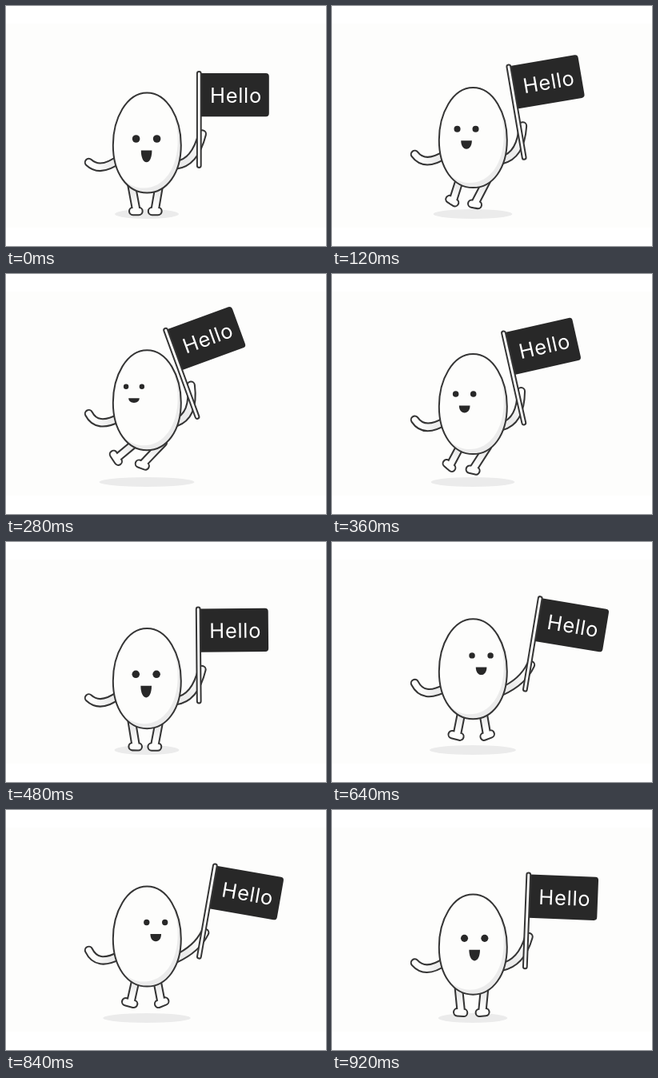
These frames come from a looping animation (400 by 300 pixels, 960 ms). An HTML page with a canvas:

```html
<!DOCTYPE html>
<html lang="en">
<head>
<meta charset="utf-8">
<title>Hello</title>
<style>
html, body { margin: 0; width: 100%; height: 100%; overflow: hidden; background: #fff; }
canvas { display: block; width: 400px; height: 300px; }
</style>
</head>
<body>
<canvas id="stage"></canvas>
<script>
const LOOP = 960, STEP = 40;
const INK = '#353535', DARK = '#282828', SHADE = '#ebebeb', PAPER = '#fdfdfc';
const canvas = document.getElementById('stage');
const ctx = canvas.getContext('2d');
const dpr = window.devicePixelRatio || 1;
canvas.width = 400 * dpr;
canvas.height = 300 * dpr;
ctx.scale(dpr, dpr);

// Each value: [at rest, change at top of left hop, change at top of right hop]
const POSE = {
  lift: [0, -13.6, -19.2],
  shadow: [40, 20, 22],
  tilt: [0, -20.6, 14.8],
  poleX: [241.3, -1.2, -0.7], poleY: [203, -22, -24.5],
  faceX: [175.6, -16.1, 17.3], faceY: [166, -26, -38],
  gap: [13, -3.2, -2.3], eye: [4.8, -1.65, -1.7], mouth: [14.8, -9.4, -8.2],
  shoulderLY: [191, -12, -14], handLY: [195.5, -21.5, -30],
  bendLX: [118, -4.4, -6], bendLY: [209, -15, -18],
  handRX: [245.3, -14.5, 5], handRY: [160, -21.5, -10],
  bendRX: [236, 0, 4], bendRY: [196.5, -20, -34],
  hipLX: [157, 5, 8], hipRX: [191.5, 5, -4.5],
  toeLX: [158.7, -25, -13.5], toeLY: [256.5, -32, -25],
  heelLX: [166, -26.5, -9.5], heelLY: [256.5, -23, -21],
  heelRX: [182.5, -16.6, 12], heelRY: [256.5, -20, -21],
  toeRX: [190, -16.3, 13], toeRY: [256.5, -17, -26]
};

function hop(t, mid, half, power) {
  const d = Math.abs(t - mid) / half;
  return d < 1 ? Math.cos(d * Math.PI / 2) ** power : 0;
}

function poseAt(t) {
  const left = hop(t, 252, 254, 2), right = hop(t, 743, 212, 1.4);
  const p = {};
  for (const key in POSE) {
    const [rest, l, r] = POSE[key];
    p[key] = rest + l * left + r * right;
  }
  return p;
}

function ellipse(x, y, rx, ry, fill) {
  ctx.beginPath();
  ctx.ellipse(x, y, rx, ry, 0, 0, Math.PI * 2);
  ctx.fillStyle = fill;
  ctx.fill();
}

function strokePath(path, width, color) {
  ctx.lineWidth = width;
  ctx.strokeStyle = color;
  ctx.stroke(path);
}

// Outlined tube, shaded from the body end (x0, y0) to the tip
function limb(path, x0, y0, x1, y1) {
  const fill = ctx.createLinearGradient(x0, y0, x1, y1);
  fill.addColorStop(0.3, SHADE);
  fill.addColorStop(0.8, PAPER);
  strokePath(path, 11.4, INK);
  strokePath(path, 7.3, fill);
}

function arm(x0, y0, cx, cy, x1, y1) {
  const path = new Path2D();
  path.moveTo(x0, y0);
  path.quadraticCurveTo(cx, cy, x1, y1);
  limb(path, x0, y0, x1, y1);
}

function leg(hx, hy, heelX, heelY, toeX, toeY, mix) {
  const ax = heelX + (toeX - heelX) * mix, ay = heelY + (toeY - heelY) * mix;
  const path = new Path2D();
  path.moveTo(hx, hy);
  path.lineTo(ax, ay);
  path.moveTo(heelX, heelY);
  path.lineTo(toeX, toeY);
  limb(path, hx, hy, ax, ay);
}

const egg = new Path2D('M176.3 108.4C202 108.4 218.8 141 218.8 174' +
  'C218.8 209 201 233.5 176.3 233.5C151.6 233.5 133.8 209 133.8 174C133.8 141 150.6 108.4 176.3 108.4Z');

function drawEgg(lift) {
  ctx.save();
  ctx.translate(0, lift);
  ctx.save();
  ctx.clip(egg);
  ctx.fillStyle = SHADE;
  ctx.fill(egg);
  ctx.translate(-4, -6);
  ctx.fillStyle = PAPER;
  ctx.fill(egg);
  ctx.restore();
  strokePath(egg, 2, INK);
  ctx.restore();
}

function drawFace(p) {
  for (const side of [-1, 1]) ellipse(p.faceX + side * p.gap, p.faceY, p.eye, p.eye, DARK);
  const w = 6.8, h = p.mouth;
  ctx.save();
  ctx.translate(p.faceX, p.faceY + 14.5);
  ctx.beginPath();
  ctx.moveTo(-w, 0);
  ctx.lineTo(w, 0);
  ctx.bezierCurveTo(w, h * 0.6, w * 0.6, h, 0, h);
  ctx.bezierCurveTo(-w * 0.6, h, -w, h * 0.6, -w, 0);
  ctx.fillStyle = DARK;
  ctx.fill();
  ctx.restore();
}

function drawFlag(p) {
  ctx.save();
  ctx.translate(p.poleX, p.poleY);
  ctx.rotate(p.tilt * Math.PI / 180);
  ctx.fillStyle = DARK;
  ctx.beginPath();
  ctx.roundRect(2, -119, 85.5, 54.3, [0, 4, 4, 0]);
  ctx.fill();
  ctx.fillStyle = '#fff';
  ctx.font = '400 25.5px Inter, sans-serif';
  ctx.letterSpacing = '0.7px';
  ctx.textAlign = 'center';
  ctx.fillText('Hello', 46.2, -82.2);
  const pole = new Path2D();
  pole.moveTo(0, -118.5);
  pole.lineTo(0, -3.4);
  strokePath(pole, 6.8, INK);
  strokePath(pole, 2.8, PAPER);
  ctx.restore();
}

function draw(t) {
  const p = poseAt(t);
  ctx.fillStyle = '#fff';
  ctx.fillRect(0, 0, 400, 300);
  ctx.fillStyle = PAPER;
  ctx.fillRect(0, 22, 400, 255);
  ctx.lineCap = ctx.lineJoin = 'round';
  ellipse(176, 260, p.shadow, 6, SHADE);
  leg(p.hipLX, 224 + p.lift, p.heelLX, p.heelLY, p.toeLX, p.toeLY, 0.4);
  leg(p.hipRX, 224 + p.lift, p.heelRX, p.heelRY, p.toeRX, p.toeRY, 0.45);
  arm(142, p.shoulderLY, p.bendLX, p.bendLY, 103.5, p.handLY);
  arm(212, 199 + p.lift, p.bendRX, p.bendRY, p.handRX, p.handRY);
  drawEgg(p.lift);
  drawFace(p);
  drawFlag(p);
}

const start = performance.now();
function tick() {
  const t = (performance.now() - start) % LOOP;
  draw(Math.floor(t / STEP) * STEP);
  requestAnimationFrame(tick);
}
tick();
</script>
</body>
</html>
```
